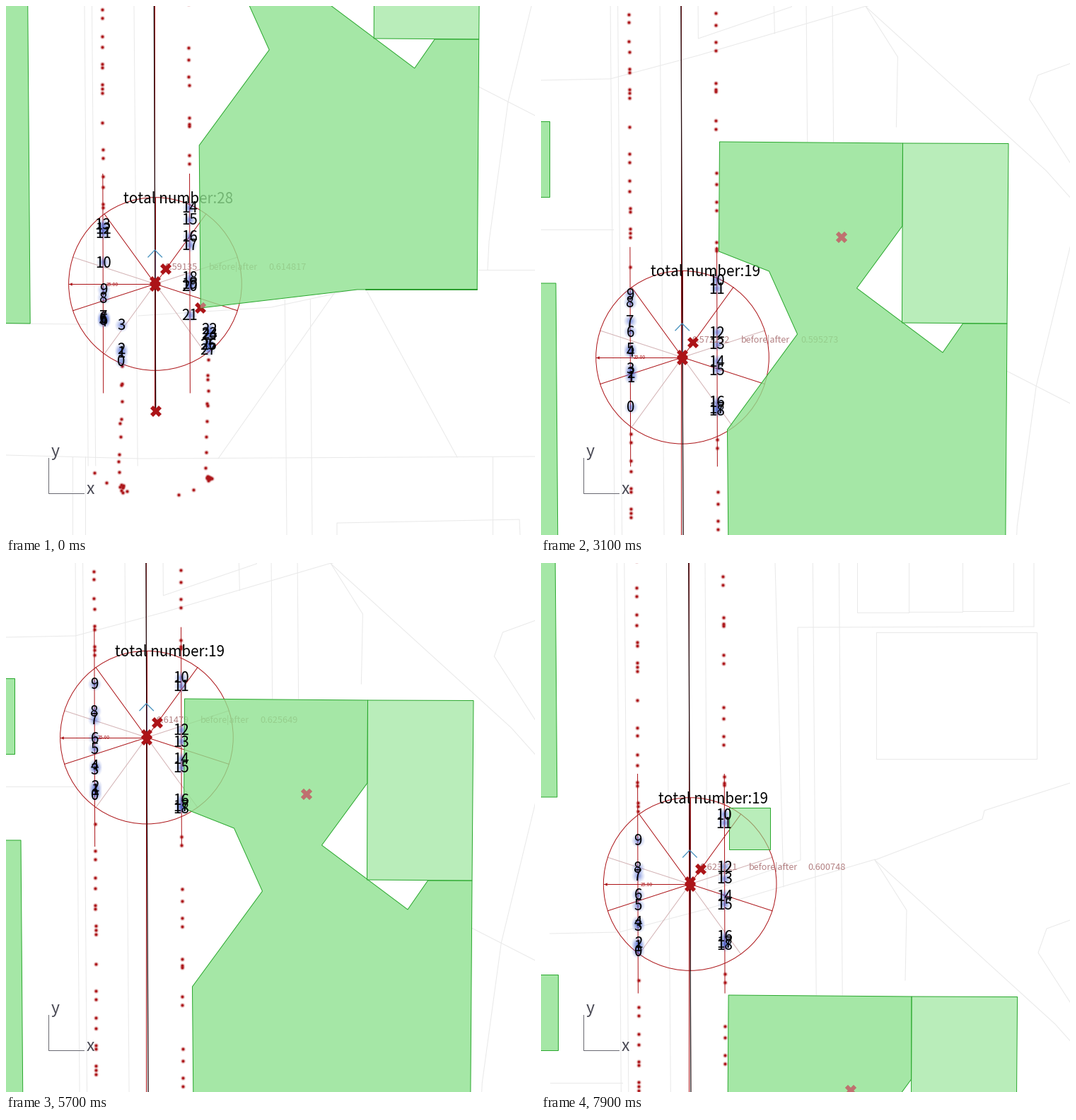
Animation, 748 px wide and 748 px high, one loop 8 s. Source, as a matplotlib script:

```python
import random
import numpy as np
import matplotlib.pyplot as plt
from matplotlib.animation import FuncAnimation
from matplotlib.patches import Circle, Polygon
from matplotlib.transforms import Affine2D

SIZE, DPI, FRAMES = 748, 100, 80
PX = 72 / DPI
REACH = 122.6                 # detection radius
START_Y, SPEED = 393, 9.62    # vehicle start and pixels per step
PATH_END = 573
FONT = "Noto Sans CJK JP"

RED = "#ac1418"
FADED = "#c07070"
PALE = "#b48284"
GRID = "#e9e9e9"
GREEN = (143 / 255, 226 / 255, 144 / 255)
EDGE = "#2aa82e"

# Camera jumps: first step and map offset
VIEWS = [(0, (0, 0)), (20, (-9.7, 402)), (63, (2.9, 821))]

fig = plt.figure(figsize=(SIZE / DPI, SIZE / DPI), dpi=DPI, facecolor="white")
ax = fig.add_axes([0, 0, 1, 1])
ax.set_xlim(0, SIZE)
ax.set_ylim(SIZE, 0)
ax.axis("off")

world, car = Affine2D(), Affine2D()
to_world = world + ax.transData
to_car = car + ax.transData
rng = random.Random(4)


def axis_x(y):
    """Driving axis, slightly off the vertical."""
    return 209.3 + .0042 * y


def line(pts, color, width=1, trans=ax.transData, z=1, **kw):
    xs, ys = zip(*pts)
    return ax.plot(xs, ys, color=color, lw=width * PX, zorder=z,
                   transform=trans, **kw)[0]


def markers(pts, shape, size, color, trans, z, **kw):
    pts = np.array(pts, float).reshape(-1, 2)
    return ax.plot(*pts.T, shape, ms=size * PX, color=color, mew=0,
                   zorder=z, transform=trans, **kw)[0]


def label(x, y, text, size, color, trans=ax.transData, z=2.5, **kw):
    return ax.text(x, y, text, fontsize=size * PX, color=color, family=FONT,
                   va="baseline", zorder=z, transform=trans, **kw)


def shifted(pts, view):
    dx, dy = VIEWS[view][1]
    return [(x - dx, y - dy) for x, y in pts]


def box(x0, y0, x1, y1):
    return [(x0, y0), (x1, y0), (x1, y1), (x0, y1), (x0, y0)]


# --- street map -----------------------------------------------------------
def upright(x, top, bottom, lean=.008):
    line([(x + lean * top, top), (x + lean * bottom, bottom)], GRID, 1,
         to_world)


for x in (111, 121.5, 181):
    upright(x, -821, 650)
for x in (388, 425):
    upright(x, -821, -210)
for x in (391, 427):
    upright(x, 415, SIZE)
for x in (94, 112, 688):
    upright(x, 637, SIZE, 0)

STREETS = [
    (0, [(0, 449), (113, 450)]),
    (0, [(187, 438), (375, 426), (497, 400)]),
    (0, [(467, 402), (300, 640)]),
    (0, [(509, 401), (638, 638)]),
    (0, [(0, 635), (190, 640), (748, 637)]),
    (0, [(668, 114), (760, 161)]),
    (0, [(668, 373), (760, 373)]),
    (0, [(760, -70), (710, 135), (683, 333), (681, 373)]),
    (0, [(468, 750), (468, 731), (726, 726), (727, 750)]),
    (1, [(0, 105), (98, 103), (222, 70), (460, 0)]),
    (1, [(0, 316), (102, 316)]),
    (2, [(472, 420), (517, 491), (515, 590)]),
    (2, [(770, 700), (727, 652), (472, 420), (624, 362), (627, 350),
         (770, 304)]),
    (2, [(770, 497), (715, 517), (703, 551), (770, 655)]),
    (2, [(697, 0), (697, 90), (363, 91), (367, 420), (235, 465), (232, 0)]),
    (2, [(331, 0), (343, 458)]),
    (2, box(474, 98, 701, 277)),
    (2, box(447, -9, 520, 70)),
    (2, box(520, -9, 596, 69)),
    (2, box(596, -9, 668, 68)),
]
for view, path in STREETS:
    line(shifted(path, view), GRID, 1, to_world)

# --- buildings, translucent above the sensor overlay ----------------------
BUILDINGS = [
    (1, .8, [(252.5, 192), (511.5, 194), (511, 311), (446.5, 399),
             (568, 490), (596.5, 449), (659, 449), (656.5, 803), (487, 803),
             (265.5, 829), (263.5, 599), (362.5, 464), (322.5, 375),
             (251.5, 347)]),
    (1, .62, [(511.5, 194), (661, 194.5), (659, 449), (510.5, 448)]),
    (1, .8, [(-60, 392), (21, 392), (24.5, 851), (-60, 850)]),
    (1, .8, box(-60, 162.5, 11.7, 270)),
    (2, .8, [(-60, -20), (20, -20), (22.8, 331), (-60, 331)]),
    (2, .62, box(265.6, 346.3, 323.7, 405)),
]
blocks = [ax.add_patch(Polygon(shifted(pts, view), fc=GREEN + (alpha,),
                               ec=EDGE, lw=PX, zorder=3, transform=to_world))
          for view, alpha, pts in BUILDINGS]
line([(509, 401), (666, 401)], "#159018", 1.6, to_world, 3.1)

# --- driving axis and fixed crosses ---------------------------------------
line([(axis_x(y), y) for y in (PATH_END, -830)], "#24090c", 1.3, to_world,
     2.05)
guide = line([(0, 0), (0, 0)], RED, 1, to_world, 1.9)
crosses = [(212, PATH_END), (275.3, 427), (435.2, -75)]
markers(crosses, "X", 16, RED, to_world, 2.6)
faded = markers(crosses, "X", 16, FADED, to_world, 3.2)
faded.set_clip_path(blocks[0])


# --- detections: two rows of repeating posts, ragged towards the start ----
def row(base, period, x):
    ys = [y - period * k for k in range(-1, 6) for y in base]
    return [(x + .0044 * (y - 285), y) for y in ys if y < 440]


def ragged(ys, x, slope):
    return [(x - slope * (y - 500) + rng.uniform(-1, 1), y) for y in ys]


def heap(x, y, count, spread):
    return [(rng.gauss(x, spread), rng.gauss(y, spread))
            for _ in range(count)]


left = row([321, 314.5, 309, 285, 280, 256, 241, 214.5, 203, 164.5],
           197.8, 137)
left += [(137.7, y) for y in (441, 444, 446)]
left += ragged([451, 485, 490, 502], 163.5, 0)
left += ragged([509 + 25 * k for k in range(7)], 165, .035)
left += ragged([509 + 27 * k for k in (1, 3, 5)], 165, .035)
left += heap(164, 682, 7, 2.5) + [(125, 660), (142, 674), (171, 686)]

right = row([338, 326, 301.5, 285, 223, 211, 170, 167, 158], 225.6, 259.3)
right += ragged([500 + 21.8 * k for k in range(-2, 8)], 286, .028)
right += ragged([463, 465, 479, 486, 528, 562], 285.5, .028)
right += heap(287, 667, 8, 3) + [(265, 684), (244, 691)]

# Numbered up the left side, then down the right side
points = np.array(sorted(left, key=lambda p: -p[1])
                  + sorted(right, key=lambda p: p[1]))

dots = [markers([], "o", size, RED, to_world, 2.2, alpha=alpha)
        for size, alpha in ((7, .2), (5, .35), (3.3, 1))]
glow = [markers([], "o", size, "#3c5cd2", to_world, 2.3,
                alpha=.9 / size) for size in range(5, 21, 2)]
numbers = [label(0, 0, "", 20.6, "black", to_world, 5, ha="center")
           for _ in range(36)]

# --- sensor overlay, relative to the vehicle ------------------------------
ax.add_patch(Circle((0, 0), 122.3, fill=False, ec=RED, lw=PX, zorder=2,
                    transform=to_car))
for deg in range(18, 360, 36):
    a = np.radians(deg)
    soft = deg in (18, 162, 234, 306)
    line([(0, 0), (122.3 * np.cos(a), -122.3 * np.sin(a))],
         "#d3b2b4" if soft else RED, 1, to_car, 1.8 if soft else 2)
line([(0, 0), (-122, 0)], RED, 1, to_car, 2)
markers([(-119.5, 0)], "<", 4.5, RED, to_car, 2)
for x in (-73.7, 49):
    line([(x - .4, -155.5), (x + .4, 154)], RED, 1, to_car, 2)
line([(0, 0), (0, -47)], "#4a86d0", 1, to_car, 2.1, alpha=.4)
line([(-10, -38), (-.5, -48), (9.5, -38)], "#4691be", 1.3, to_car, 2.4)
markers([(0, -3.2), (0, 3), (15, -21)], "X", 16, RED, to_car, 2.7)
label(-69.5, 2.5, "25.00", 6.8, RED, to_car)
total = label(-45, -114.3, "", 20.6, "black", to_car)
before = label(13.5, -20.5, "", 12.8, PALE, to_car)
middle = label(0, -20.5, "before|after", 12.6, PALE, to_car)
after = label(0, -20.5, "", 12.8, PALE, to_car)

# --- axis gizmo -----------------------------------------------------------
line([(60.5, 639), (60.5, 688.5), (110, 688.5)], "#6a6a72", 1, z=6)
label(64, 637, "y", 23, "#4a4a55", z=6)
label(113.5, 690, "x", 23, "#4a4a55", z=6)

scores = [[f"{rng.uniform(.57, .63):.6g}" for _ in range(2)]
          for _ in range(FRAMES)]


def update(n):
    dx, dy = [offset for start, offset in VIEWS if n >= start][-1]
    cy = START_Y - SPEED * n
    cx = axis_x(cy)
    world.clear().translate(dx, dy)
    car.clear().translate(cx + dx, cy + dy)
    guide.set_data([axis_x(-dy) + .3] * 2, [-dy, PATH_END])

    near = np.hypot(points[:, 0] - cx, points[:, 1] - cy) < REACH
    active = points[near]
    for d in dots:
        d.set_data(*points[~near].T)
    for g in glow:
        g.set_data(*active.T)
    for i, num in enumerate(numbers):
        shown = i < len(active)
        num.set_visible(shown)
        if shown:
            num.set_position(active[i] + (0, 7.3))
            num.set_text(str(i))
    total.set_text(f"total number:{len(active)}")

    first, second = scores[n]
    x = 27 + 7 * len(first)
    before.set_text(first)
    middle.set_x(x)
    after.set_x(x + 84)
    after.set_text(second)
    return []


anim = FuncAnimation(fig, update, frames=FRAMES, interval=100, repeat=True,
                     repeat_delay=0, blit=False)
plt.show()
```
